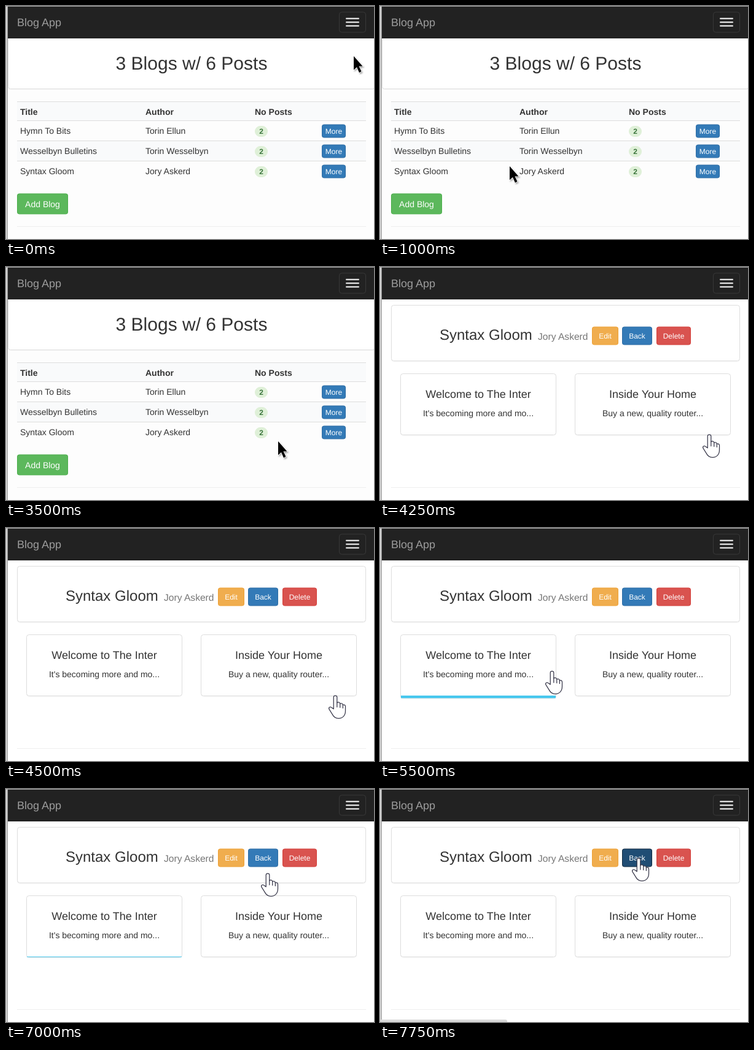
These frames come from a looping animation (599x381 px, 8000 ms). An HTML page:

```html
<!DOCTYPE html>
<html lang="en">
<head>
<meta charset="utf-8">
<title>Blog App</title>
<style>
  html, body { margin: 0; width: 100%; height: 100%; overflow: hidden; background: #fdfdfd; }
  svg { display: block; width: 599px; height: 381px; }
  text { font: 14px "Liberation Sans", Arial, sans-serif; fill: #333; text-rendering: geometricPrecision; }
  .mid { text-anchor: middle; }
  .bold { font-weight: bold; }
</style>
</head>
<body>
<svg viewBox="0 0 599 381">
  <defs>
    <clipPath id="slot"><rect id="slotRect" x="33" y="274" width="254" height="0"/></clipPath>
    <filter id="soft" x="-50%" y="-50%" width="200%" height="200%">
      <feDropShadow dx="1.5" dy="2" stdDeviation="1.2" flood-opacity=".35"/>
    </filter>
  </defs>
  <rect width="599" height="381" fill="#fdfdfd"/>
  <g id="list"></g>
  <g id="detail"></g>
  <path d="M18 360.5H586" stroke="#eee"/>
  <g id="frame"></g>
  <path id="status" d="M0 377H204q3 0 3 3V381H0z" fill="#d9d9d9"/>
  <g id="arrow" filter="url(#soft)">
    <path d="M1 0V22.5l5-4.5 4 9 3.5-2-4-8.5h6z" stroke="#fff" stroke-width="1.2" paint-order="stroke"/>
  </g>
  <g id="hand" stroke="#3c3c4e" stroke-width="1.25" stroke-linejoin="round" stroke-linecap="round">
    <g transform="translate(-1 -.8) scale(1.03)">
      <path fill="#fff" d="M8 22V3.5a2.7 2.7 0 0 1 5.4 0V12q4-1.8 4.8 1.6q3.8-1.4 4.5 2q3.6-1 4 2.5V25c0 7-4 12-11 12c-5 0-8-3-10-7L1 22.5c-1.5-3 2-5 4-2.5z"/>
      <path fill="none" d="M13.4 12v7M18.2 13.6v6M22.7 15.6v5"/>
    </g>
  </g>
</svg>
<script>
const $ = id => document.getElementById(id);
const BLUE = ['#337ab7', '#2e6da4'];
const BLUE_HOVER = ['#286090', '#204d74'];
const BLUE_PRESSED = ['#204d74', '#122b40'];

const text = (x, y, str, size = 14, fill = '#333', cls = '') =>
  `<text x="${x}" y="${y}" class="${cls}" style="font-size:${size}px;fill:${fill}">${str}</text>`;
const box = (x, y, w, h, r, fill, stroke, id = '') =>
  `<rect id="${id}" x="${x + .5}" y="${y + .5}" width="${w - 1}" height="${h - 1}" rx="${r}" fill="${fill}" stroke="${stroke}"/>`;
const rule = (x, y, w, h, fill, r = 0) =>
  `<rect x="${x}" y="${y}" width="${w}" height="${h}" rx="${r}" fill="${fill}"/>`;
const button = (x, y, w, h, label, [fill, stroke], size = 12, id = '') =>
  box(x, y, w, h, 3, fill, stroke, id) +
  text(x + w / 2, y + h / 2 + size * .36, label, size, '#fff', 'mid');
const panel = (x, y, w, h, id) =>
  box(x, y + 1, w, h, 4, 'none', '#f5f5f5') + box(x, y, w, h, 4, '#fff', '#ddd', id);

$('frame').innerHTML =
  rule(0, 0, 1, 381, '#eee') + rule(1, 0, 2, 381, '#b0b0b0') +
  rule(3, 0, 596, 53, '#222') + rule(0, 0, 599, 1, '#aaa') +
  text(18, 32.5, 'Blog App', 18, '#9d9d9d') +
  box(542, 9.5, 44, 34, 4, 'none', '#383838') +
  [19.5, 25.5, 31.5].map(y => rule(553, y, 22, 2, '#fff', 1)).join('');

const blogs = [
  ['Hymn To Bits', 'Torin Ellun'],
  ['Wesselbyn Bulletins', 'Torin Wesselbyn'],
  ['Syntax Gloom', 'Jory Askerd']
];
$('list').innerHTML =
  panel(3, 40, 598, 96) +
  text(302, 104, '3 Blogs w/ 6 Posts', 30, '#333', 'mid') +
  rule(18, 157, 568, 30, '#f9fafb') + rule(18, 221, 568, 32, '#f9fafb') +
  [156, 187, 220, 253].map(y => rule(18, y, 568, 1, '#ddd')).join('') +
  [[23, 'Title'], [227, 'Author'], [405, 'No Posts']]
    .map(([x, label]) => text(x, 178, label, 14, '#333', 'bold')).join('') +
  blogs.map(([title, author], i) => {
    const y = 204 + 33 * i;
    return text(23, y + 5, title) + text(227, y + 5, author) +
      box(405, y - 8, 21, 18, 8.5, '#dff0d8', '#dff0d8') +
      text(415.5, y + 5, '2', 12, '#3c763d', 'mid bold') +
      button(514, y - 10.5, 39, 22, 'More', BLUE, 12, 'more' + i);
  }).join('') +
  button(18, 306.5, 83, 34, 'Add Blog', ['#5cb85c', '#4cae4c'], 14);

const card = (x, title, summary, id) =>
  panel(x, 174, 254, 101, id) +
  text(x + 127, 214, title, 18, '#333', 'mid') +
  text(x + 127, 243.5, summary, 14, '#333', 'mid');
$('detail').innerHTML =
  rule(0, 53, 599, 328, '#fff') +
  panel(18, 62, 568, 92) +
  text(97, 118.5, 'Syntax Gloom', 24) +
  text(257, 118.5, 'Jory Askerd', 15.6, '#777') +
  button(345, 97.5, 43, 30, 'Edit', ['#f0ad4e', '#eea236']) +
  button(394, 97.5, 49, 30, 'Back', BLUE, 12, 'back') +
  button(450, 97.5, 56, 30, 'Delete', ['#d9534f', '#d43f3a']) +
  card(33, 'Welcome to The Inter', "It's becoming more and mo...", 'openCard') +
  card(317, 'Inside Your Home', 'Buy a new, quality router...', 'closedCard') +
  '<g clip-path="url(#slot)">' + rule(34, 274, 252, 41, '#47c8ee') +
  text(160, 299.5, '19 Jan 2015', 14, '#fff', 'mid') + '</g>';

const LOOP = 8000, STEP = 250, PAGE_CHANGE = 4250;
// Pointer stops: time, left, top
const arrowStops = [
  [0, 565, 82], [250, 440, 150], [500, 274, 243], [1000, 210, 262], [1250, 130, 286],
  [1500, 220, 284], [1750, 370, 268], [2000, 439, 201], [2250, 420, 184],
  [2500, 382, 250], [2750, 442, 285], [3750, 490, 276]
];
const handStops = [
  [4000, 526, 272], [4250, 526, 274], [4750, 490, 273], [5000, 425, 267],
  [5250, 345, 254], [5500, 270, 234], [5750, 244, 224], [6000, 240, 222],
  [6750, 320, 182], [7000, 416, 138], [7250, 413, 119], [7500, 411, 113]
];

const ease = (t, start, length) => {
  const p = Math.min(1, Math.max(0, (t - start) / length));
  return p * p * (3 - 2 * p);
};
const show = (id, on) => $(id).setAttribute('visibility', on ? 'visible' : 'hidden');
const paint = (id, [fill, stroke]) => {
  $(id).setAttribute('fill', fill);
  $(id).setAttribute('stroke', stroke);
};
const place = (id, stops, t) => {
  const [, x, y] = stops.filter(([at]) => at <= t).pop() || stops[0];
  $(id).setAttribute('transform', `translate(${x} ${y})`);
};

function draw(now) {
  const t = Math.floor((now % LOOP) / STEP) * STEP;
  const onDetail = t >= PAGE_CHANGE, handShown = t >= 4000;
  show('list', !onDetail);
  show('detail', onDetail);
  show('arrow', !handShown);
  show('hand', handShown);
  show('status', t >= 7250);
  place('arrow', arrowStops, t);
  place('hand', handStops, t);

  const opened = 41 * (ease(t, 5400, 500) - ease(t, 6590, 450));
  $('slotRect').setAttribute('height', opened);
  $('openCard').setAttribute('height', 100 + opened);

  paint('more2', t === 4000 ? BLUE_HOVER : BLUE);
  paint('back', t >= 7750 ? BLUE_PRESSED : t >= 7250 ? BLUE_HOVER : BLUE);
}

const begin = performance.now();
(function tick() {
  draw(performance.now() - begin);
  requestAnimationFrame(tick);
})();
</script>
</body>
</html>
```
